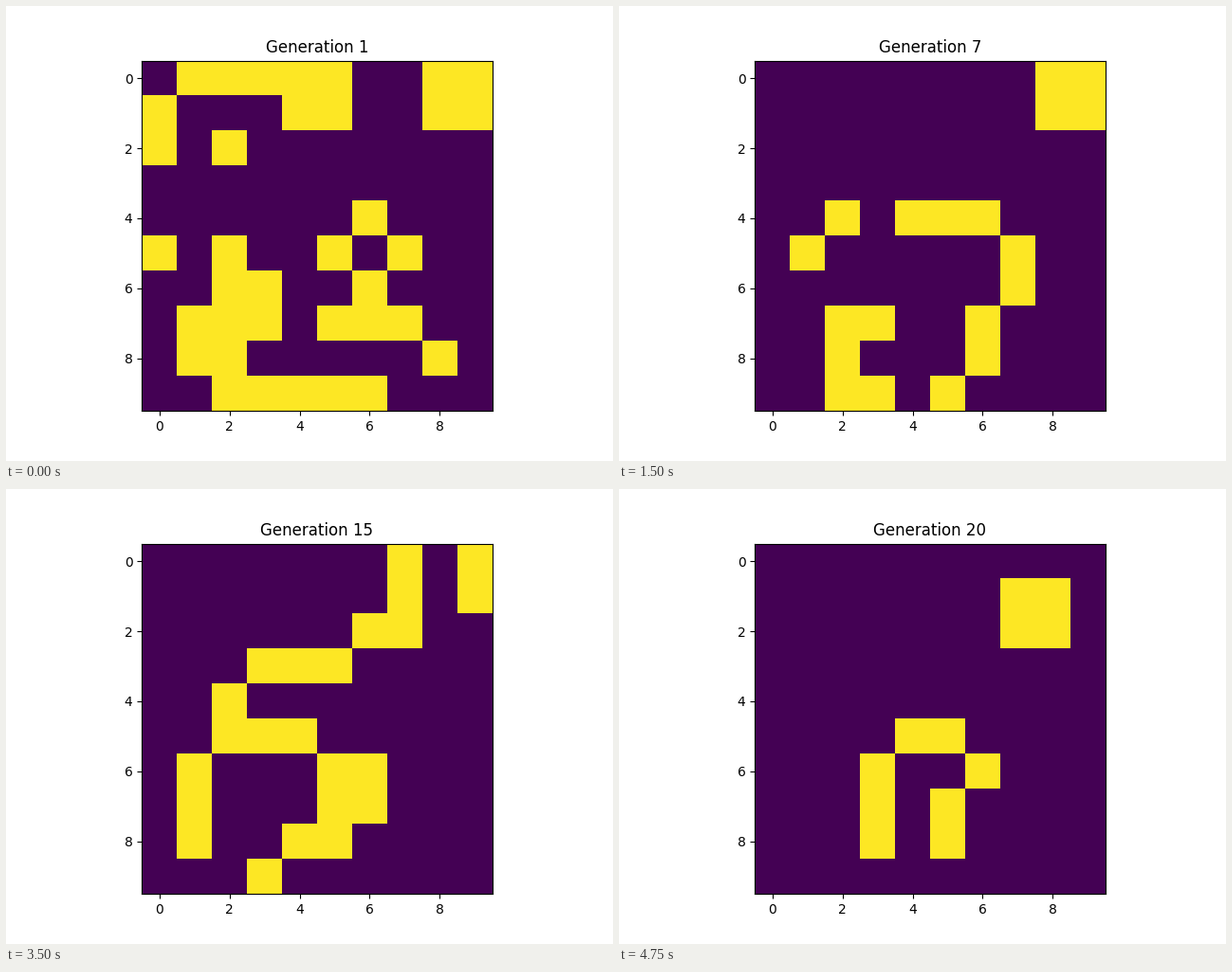
Animation of 640 by 480 pixels, one loop 5000 ms. Source, as a matplotlib script:

```python
import numpy as np
import matplotlib.pyplot as plt
from matplotlib.animation import FuncAnimation

GENERATIONS = 20
INTERVAL = 250

START = """
.#####..##
#...##..##
#.#.......
..........
......#...
#.#..#.#..
..##..#...
.###.###..
.##.....#.
..#####...
"""


def parse(text):
    return np.array([[int(c == "#") for c in row] for row in text.split()])


def step(grid):
    """Next generation; everything beyond the border is dead."""
    rows, cols = grid.shape
    padded = np.pad(grid, 1)
    block = sum(padded[r:r + rows, c:c + cols]
                for r in range(3) for c in range(3))
    return ((block == 3) | ((block == 4) & (grid == 1))).astype(int)


history = [parse(START)]
while len(history) < GENERATIONS:
    history.append(step(history[-1]))

fig, ax = plt.subplots(figsize=(6.4, 4.8), dpi=100)
image = ax.imshow(history[0], cmap="viridis", vmin=0, vmax=1,
                  interpolation="nearest")
title = ax.set_title("Generation 1")


def update(i):
    image.set_data(history[i])
    title.set_text(f"Generation {i + 1}")
    return image, title


anim = FuncAnimation(fig, update, frames=GENERATIONS, interval=INTERVAL,
                     init_func=lambda: update(0), repeat=True, repeat_delay=0)
plt.show()
```
